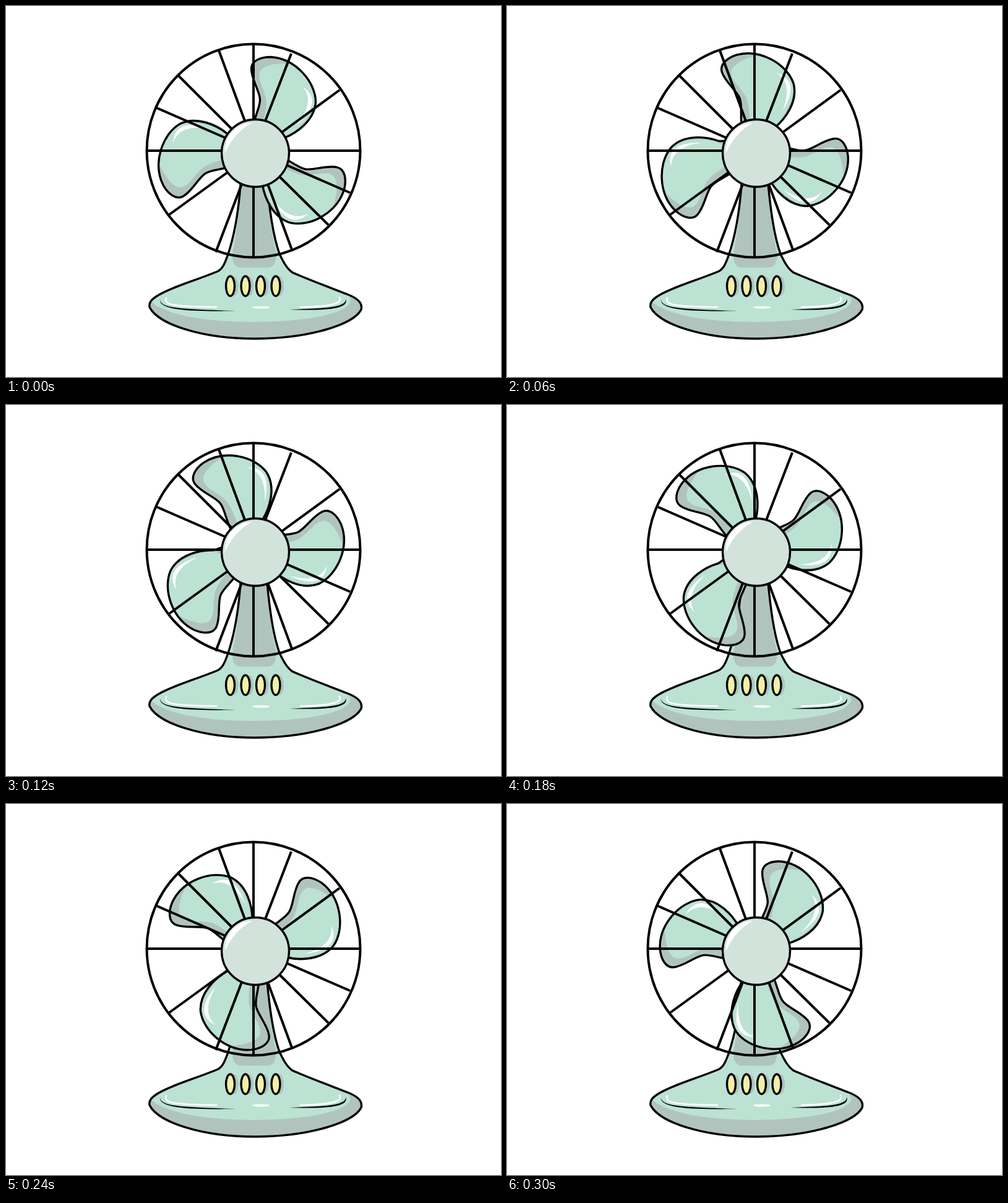
These frames come from a looping animation (800x600 px, 0.36 s). An HTML page:

```html
<!DOCTYPE html>
<html lang="en">
<head>
<meta charset="utf-8">
<title>Desk fan</title>
<style>
  html, body { margin: 0; width: 100%; height: 100%; overflow: hidden; background: #fff; }
  svg { display: block; width: 100vw; height: 100vh; }
  .mint { fill: #bce2d3; }
  .shade { fill: #b0c4bd; }
  .shine { fill: #fff; }
  .line { fill: none; stroke: #000; stroke-width: 3.4; stroke-linecap: round; stroke-linejoin: round; }
  .cage { stroke-width: 4; stroke-linecap: butt; }
  .glint { fill: none; stroke: #fff; stroke-width: 2.5; stroke-linecap: round; }
</style>
</head>
<body>
<svg viewBox="0 0 800 600">
  <defs>
    <path id="body" d="M379 288C376 330 369 372 358 404C353 418 349 427 340 430C303 445 264 456 244 469C233 476 231 481 232 487C245 514 315 538 402 538C490 538 562 515 574 491C577 480 567 472 551 466C520 454 490 443 463 431C453 424 448 413 442 401C431 370 426 328 422 288Z"/>
    <clipPath id="inside"><use href="#body"/></clipPath>
    <path id="edge" d="M397 212C399 180 412 165 411 150C410 136 397 118 397 101C397 88 412 82 428 82C468 84 501 122 501 155C499 185 470 205 450 213L420 240Z"/>
    <clipPath id="bladeInside"><use href="#edge"/></clipPath>
    <g id="blade">
      <use href="#edge" class="shade"/>
      <path class="mint" clip-path="url(#bladeInside)" d="M409 212C416 182 425 164 420 146C416 130 407 118 411 106C416 93 442 92 458 93C482 105 499 130 500 152C498 177 472 202 449 211Z"/>
      <path class="shine" d="M480 130C503 146 500 166 470 192C490 168 495 148 480 130Z"/>
      <use href="#edge" class="line"/>
    </g>
  </defs>

  <g clip-path="url(#inside)">
    <path class="shade" d="M220 280H590V545H220Z"/>
    <path class="mint" d="M340 280H460V432L540 462C552 466 558 472 556 479C548 500 475 511 400 511C330 511 262 502 234 478L220 440Z"/>
    <path class="shade" d="M377 280H424C424 330 430 375 437 400C436 418 432 423 422 423H380C370 423 365 415 366 400C373 365 377 330 377 280Z"/>
  </g>
  <use href="#body" class="line"/>
  <path class="glint" d="M259 472C255 483 267 486 340 487M476 487C530 486 544 480 539 471"/>
  <path d="M249 474C249 489 280 490 372 493C286 495 246 490 249 474ZM549 474C550 488 515 489 458 491C519 493 555 490 549 474Z"/>
  <ellipse class="shine" cx="412" cy="487.500" rx="14" ry="2"/>
  <g id="buttons"></g>

  <g id="rotor">
    <use href="#blade" transform="translate(-.5 .5)"/>
    <use href="#blade" transform="translate(-1 -4) rotate(-120 403 238)"/>
    <use href="#blade" transform="translate(-3 -1) rotate(102.500 403 238)"/>
  </g>

  <g class="line cage">
    <circle cx="400" cy="234" r="172.500"/>
    <path d="M400 62V186M344 72L386 186M279 113L366 200M244 165L354 213M228 234H350M263 338L358 269M339 398L381 288M400 290V405M462 394L423 288M521 354L442 276M556 302L455 258M572 234H456M539 136L446 204M461 77L419 186"/>
  </g>
  <circle class="line" cx="403" cy="238" r="54.500" style="fill:#d2e3dc"/>
  <path class="shine" d="M354 238C352 211 372 190 397 189C380 199 364 214 354 238Z"/>
</svg>
<script>
  const buttons = document.getElementById("buttons");
  const rotor = document.getElementById("rotor");

  buttons.innerHTML = [362.5, 387, 411.5, 436].map(x => `
    <ellipse class="shade" cx="${x + 6}" cy="453" rx="7" ry="16"/>
    <ellipse class="line" cx="${x}" cy="453" rx="7" ry="16" style="fill:#f2efa6"/>`).join("");

  // Each pose: turn in degrees, then the wobble of the axle.
  const poses = [
    [0, 0, 0], [18.4, -6.4, -3.5], [36.7, -11, -5],
    [54.5, -8, -1], [68.2, 0.7, 2], [96.3, 1.5, 4.5]
  ];
  const STEP = 60;
  const start = performance.now();

  function draw() {
    const t = performance.now() - start;
    const [turn, dx, dy] = poses[Math.floor(t / STEP) % poses.length];
    rotor.setAttribute("transform", `translate(${dx} ${dy}) rotate(${-turn} 403 238)`);
    requestAnimationFrame(draw);
  }
  draw();
</script>
</body>
</html>
```
